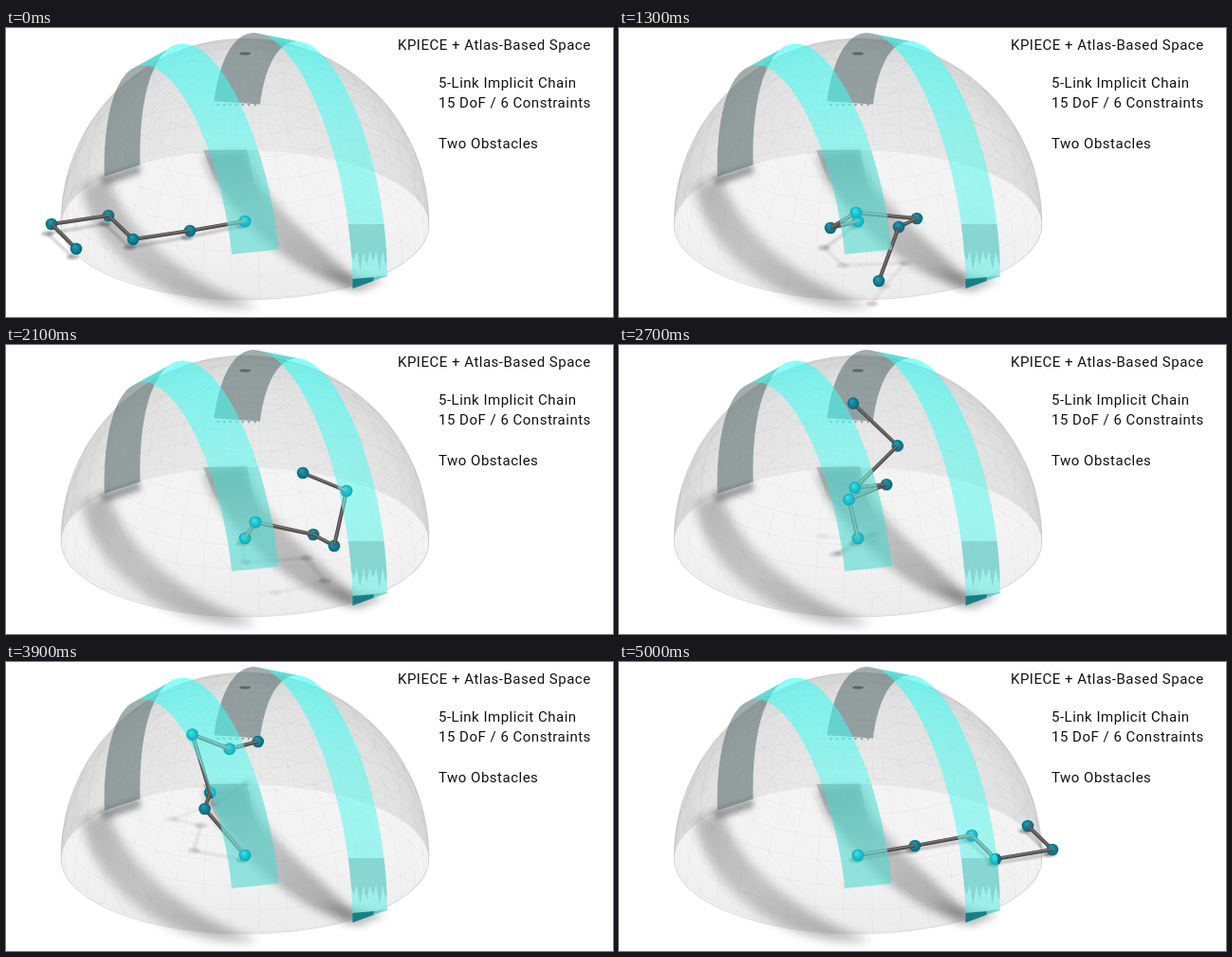
Animation of 640 by 305 pixels, one loop 5.1 s. Source, as an HTML page with a canvas:

```html
<!DOCTYPE html>
<html lang="en">
<head>
<meta charset="utf-8">
<title>Implicit chain planning</title>
<style>
  html, body { margin: 0; width: 100%; height: 100%; overflow: hidden; background: #fff; }
  canvas, svg { position: absolute; left: 0; top: 0; width: 640px; height: 305px; }
  text { font: 15px Roboto, sans-serif; letter-spacing: .5px; fill: #111; }
</style>
</head>
<body>
<canvas id="stage" width="640" height="305"></canvas>
<svg viewBox="0 0 640 305">
  <text x="413" y="23.2">KPIECE + Atlas-Based Space</text>
  <text x="456" y="63.3">5-Link Implicit Chain</text>
  <text x="456" y="84.4">15 DoF / 6 Constraints</text>
  <text x="456" y="127.3">Two Obstacles</text>
</svg>
<script>
const W = 640, H = 305, CX = 252, CY = 204;
const LINK = 65, SIN = 0.413, COS = 0.91;
const LOOP = 5100, STEP = 100;

const stage = document.getElementById('stage').getContext('2d');

function layer(paint) {
  const canvas = document.createElement('canvas');
  canvas.width = W;
  canvas.height = H;
  paint(canvas.getContext('2d'));
  return canvas;
}

// World axes on screen: c runs right, q towards the viewer, s up.
const project = (c, q, s) => [CX + 60 * c + 24.8 * q, CY - 9.7 * c + 25.3 * q - 59 * s];

function poly(points, close = true) {
  const path = new Path2D();
  points.forEach(p => path.lineTo(p[0], p[1]));
  if (close) path.closePath();
  return path;
}

// ---- Dome and obstacles ----
const R = 3.07;
const bands = [
  { c: [-1.33, -0.6], from: -0.06, to: 2.86 },
  { c: [0.65, 1.36], from: 0.27, to: 3.15 }
];

function edge(c, a, b) {
  const r = Math.sqrt(R * R - c * c), out = [];
  for (let i = 0; i <= 40; i++) {
    const th = a + (b - a) * i / 40;
    out.push(project(c, -r * Math.cos(th), r * Math.sin(th)));
  }
  return out;
}

// Angle at which the band turns from its inner to its outer face.
const turn = c => 2.686 - Math.acos(21 * c / (61.3 * Math.sqrt(R * R - c * c)));

function bandPath(band, isFront) {
  const [l, r] = band.c.map(c => isFront ? edge(c, turn(c), band.to) : edge(c, band.from, turn(c)));
  return poly(l.concat(r.reverse()));
}

const fronts = bands.map(b => bandPath(b, true));
const covered = new Path2D();
fronts.forEach(p => covered.addPath(p));

const dome = new Path2D();
dome.arc(CX, CY + 1, 194, Math.PI, 0);
dome.ellipse(CX, 208, 194, 79, 0, 0, Math.PI);
dome.closePath();

function mesh(ctx) {
  ctx.strokeStyle = 'rgba(90,90,90,.07)';
  ctx.lineWidth = 0.6;
  const at = (lat, lon) => project(
    3 * Math.cos(lat) * Math.cos(lon), 3 * Math.cos(lat) * Math.sin(lon), 3 * Math.sin(lat));
  const row = Math.PI / 24, col = Math.PI / 20;
  const draw = pts => ctx.stroke(poly(pts, false));
  for (let i = 0; i < 12; i++) {
    draw(Array.from({ length: 41 }, (_, j) => at(i * row, j * col)));
  }
  for (let j = 0; j < 40; j++) {
    draw(Array.from({ length: 12 }, (_, i) => at(i * row, j * col)));
    if (j % 2) draw(Array.from({ length: 9 }, (_, i) => at(i * row, (j + i) * col)));
  }
}

function gradient(ctx, x0, y0, x1, y1, ...stops) {
  const g = ctx.createLinearGradient(x0, y0, x1, y1);
  stops.forEach((s, i) => g.addColorStop(i / (stops.length - 1), s));
  return g;
}

function softShape(ctx, path, fill, blur) {
  ctx.save();
  ctx.filter = `blur(${blur}px)`;
  ctx.fillStyle = fill;
  ctx.fill(new Path2D(path));
  ctx.restore();
}

function ellipse(ctx, x, y, rx, ry, fill) {
  ctx.beginPath();
  ctx.ellipse(x, y, rx, ry, 0, 0, 2 * Math.PI);
  ctx.fillStyle = fill;
  ctx.fill();
}

const back = layer(ctx => {
  const wall = ctx.createRadialGradient(CX, CY, 90, CX, CY, 196);
  wall.addColorStop(0, '#e9e9e9');
  wall.addColorStop(0.75, '#e2e2e2');
  wall.addColorStop(1, '#d6d6d6');
  ctx.fillStyle = wall;
  ctx.fill(dome);
  ellipse(ctx, CX, 208, 193.5, 78.5, gradient(ctx, 0, 130, 0, 287, '#f4f4f4', '#f3f3f3', '#ececec'));

  // Obstacle shadows on the floor
  softShape(ctx, 'M80 166 L108 158 C118 190 140 216 168 240 C194 262 226 280 266 294 C214 300 158 280 122 244 C98 220 84 194 80 166Z',
    gradient(ctx, 90, 160, 215, 292, 'rgba(80,80,80,.38)', 'rgba(100,100,100,.32)', 'rgba(90,90,90,.42)'), 5.5);
  softShape(ctx, 'M98 158 L141 144 L142 153 L104 166Z', 'rgba(60,60,60,.5)', 3);
  softShape(ctx, 'M208 133 L254 131 C262 168 292 194 322 222 C344 242 356 254 370 268 L364 276 C326 266 284 238 254 206 C232 182 214 160 208 133Z',
    gradient(ctx, 225, 130, 365, 272, 'rgba(80,86,86,.4)', 'rgba(95,95,95,.36)', 'rgba(80,80,80,.46)'), 5);
  softShape(ctx, 'M330 254 L400 266 L372 279Z', 'rgba(80,80,80,.38)', 4);

  ctx.fillStyle = gradient(ctx, 0, 129, 0, 190, 'rgba(95,112,111,.38)', 'rgba(95,112,111,0)');
  ctx.fill(poly([[208, 129], [254, 128], [262, 165], [276, 190], [240, 185], [220, 160]]));

  ctx.save();
  ctx.clip(dome);
  mesh(ctx);
  ctx.restore();
  ctx.strokeStyle = 'rgba(120,120,120,.13)';
  ctx.lineWidth = 1;
  ctx.stroke(dome);

  // Inner faces
  ctx.fillStyle = 'rgba(78,100,100,.53)';
  bands.forEach(b => ctx.fill(bandPath(b, false)));
  for (let i = 0; i < 7; i++) {
    const x = 222 + i * 6.5;
    ctx.fill(poly([[x, 80], [x + 1.5, 83], [x + 3, 80]]));
  }
  ellipse(ctx, 252, 27, 6, 1.6, 'rgba(60,72,72,.65)');
});

const front = layer(ctx => {
  fronts.forEach((path, i) => {
    ctx.save();
    ctx.fillStyle = gradient(ctx, 0, 10, 0, 240, 'rgba(50,255,246,.58)', 'rgba(78,250,240,.52)', 'rgba(78,240,230,.5)');
    ctx.fill(path);
    ctx.clip(path);
    if (i === 0) {
      ctx.fillStyle = gradient(ctx, 0, 129, 0, 240, 'rgba(80,125,122,.14)', 'rgba(70,150,140,.16)');
      ctx.fillRect(200, 129, 100, 120);
    } else {
      const teeth = Array.from({ length: 13 }, (_, k) => [404 - k * 3.4, k % 2 ? 256 - k % 3 * 5 : 235]);
      ctx.fillStyle = 'rgba(70,135,135,.26)';
      ctx.fill(poly([[355, 207], [410, 207], ...teeth]));
      ctx.fillStyle = 'rgba(8,112,122,.85)';
      ctx.fill(poly([[364, 265], [388, 263], [387, 269], [364, 277]]));
      ctx.fillStyle = 'rgba(30,125,130,.3)';
      ctx.fill(poly([[388, 263], [404, 260], [404, 265], [387, 269]]));
    }
    ctx.restore();
  });
});

// ---- Chain poses: time, joint positions, depth direction of each link ----
const poses = [
  [0, [194, 214, 134, 223, 108, 198, 48, 207, 74, 233], '++-++'],
  [500, [225, 207, 163, 198, 146, 169, 84, 159, 111, 214], '+++-+'],
  [1300, [223, 211, 250, 195, 314, 201, 295, 210, 274, 267], '++-++'],
  [2100, [263, 187, 324, 200, 346, 212, 359, 154, 313, 135], '+-+++'],
  [3400, [214, 153, 208, 112, 146, 97, 188, 114, 165, 71], '+-+--'],
  [4300, [214, 154, 239, 160, 271, 105, 313, 112, 361, 132], '--+--'],
  [5000, [312, 194, 372, 183, 397, 208, 457, 198, 431, 173], '--+--']
].map(([t, xy, signs]) => {
  let x = CX, y = CY;
  const links = [...signs].map((sign, i) => {
    const dx = xy[2 * i] - x, dy = xy[2 * i + 1] - y;
    x += dx;
    y += dy;
    const dz = Math.sqrt(LINK * LINK - dx * dx - dy * dy);
    return [dx, dy, sign === '+' ? dz : -dz];
  });
  return { t, links };
});

function slope(k, i, a) {
  const p = poses[Math.max(k - 1, 0)], n = poses[Math.min(k + 1, poses.length - 1)];
  return (n.links[i][a] - p.links[i][a]) / (n.t - p.t);
}

// Smooth link directions of constant length, summed into joints.
function jointsAt(t) {
  let k = 0;
  while (k < poses.length - 2 && t >= poses[k + 1].t) k++;
  const A = poses[k], B = poses[k + 1], span = B.t - A.t;
  const u = (t - A.t) / span, u2 = u * u, u3 = u2 * u;
  const joints = [[CX, CY, 0]];
  for (let i = 0; i < 5; i++) {
    const v = [0, 1, 2].map(a =>
      (2 * u3 - 3 * u2 + 1) * A.links[i][a] + (3 * u2 - 2 * u3) * B.links[i][a] +
      span * ((u3 - 2 * u2 + u) * slope(k, i, a) + (u3 - u2) * slope(k + 1, i, a)));
    const f = LINK / (Math.hypot(...v) || 1);
    joints.push(joints[i].map((p, a) => p + v[a] * f));
  }
  return joints;
}

function line(ctx, p, q, width, color) {
  ctx.lineWidth = width;
  ctx.strokeStyle = color;
  ctx.stroke(poly([p, q], false));
}

function shadowOf([x, y, z]) {
  const h = Math.max(0, (CY - y) * COS + z * SIN);
  return [x - 3 - 0.2 * h, y + h * COS + 5, 0.4 / (1 + h / 28)];
}

function drawShadows(ctx, joints) {
  const spots = joints.map(shadowOf);
  ctx.save();
  ctx.filter = 'blur(1.3px)';
  spots.forEach((s, i) => {
    if (i) line(ctx, spots[i - 1], s, 3, `rgba(60,60,60,${0.7 * Math.min(s[2], spots[i - 1][2])})`);
    ellipse(ctx, s[0], s[1], 6.5, 2.8, `rgba(60,60,60,${s[2]})`);
  });
  ctx.restore();
}

const plain = { ball: ['#1f9db2', '#0f8297', '#086475'], rod: '#524d4d', shine: '#7d7777' };
const tinted = { ball: ['#3fe0e4', '#1cc6d2', '#10a9ba'], rod: '#62aaa6', shine: '#8accc6' };

function drawBall(ctx, [x, y], colors) {
  const g = ctx.createRadialGradient(x - 1.5, y - 2.5, 0.5, x, y, 6.5);
  colors.forEach((c, i) => g.addColorStop(i / 2, c));
  ellipse(ctx, x, y, 6.3, 6.3, g);
}

function drawChain(ctx, joints, look) {
  const parts = joints.map(p => ({ z: p[2] + 3, draw: () => drawBall(ctx, p, look.ball) }));
  for (let i = 0; i < 5; i++) {
    const p = joints[i], q = joints[i + 1];
    parts.push({
      z: (p[2] + q[2]) / 2,
      draw() {
        line(ctx, p, q, 4, look.rod);
        line(ctx, [p[0], p[1] - 0.6], [q[0], q[1] - 0.6], 1.2, look.shine);
      }
    });
  }
  parts.sort((a, b) => a.z - b.z).forEach(part => part.draw());
}

function render(now) {
  const t = Math.floor(now % LOOP / STEP) * STEP;
  const joints = jointsAt(t);
  stage.clearRect(0, 0, W, H);
  stage.drawImage(back, 0, 0);
  drawShadows(stage, joints);
  drawChain(stage, joints, plain);
  stage.drawImage(front, 0, 0);

  // The chain seen through the outer faces
  stage.save();
  stage.clip(covered);
  drawChain(stage, joints, tinted);
  stage.restore();
}

let start;
function tick(now) {
  start ??= now;
  render(Math.max(0, now - start));
  requestAnimationFrame(tick);
}
render(0);
requestAnimationFrame(tick);
</script>
</body>
</html>
```
